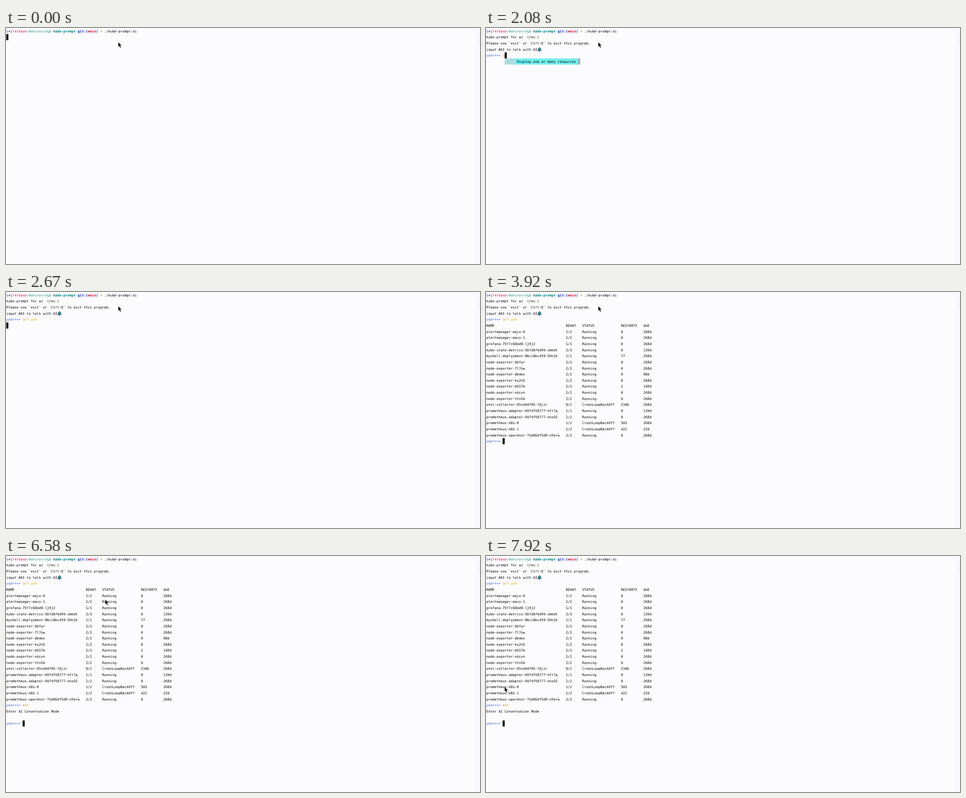
An HTML page for the animation above (8000 ms loop, 1058x529 px).

```html
<!DOCTYPE html>
<html lang="en">
<head>
<meta charset="utf-8">
<title>kube-prompt terminal</title>
<style>
  html, body { margin: 0; width: 100%; height: 100%; overflow: hidden; background: #fcfcfe; }
  svg { display: block; width: 1058px; height: 529px; }
  text { font: 7.562px "DejaVu Sans Mono", monospace; white-space: pre; text-rendering: geometricPrecision; }
  .b { font-weight: bold; }
</style>
</head>
<body>
<svg viewBox="0 0 1058 529">
  <rect x="1047" width="11" height="529" fill="#f7f8fe"/>
  <rect x="1057" y="24" width="1" height="9" fill="#dcdce4"/>
  <g id="screen"></g>
  <path id="mouse" d="M.4 .3V11.6L2.9 9.3L4.9 13.8L6.8 13L4.9 8.6H8.2Z" fill="#000" stroke="#fff" stroke-width=".6"/>
</svg>
<script>
const LOOP = 8000, CW = 4.553, LH = 13.65, LEFT = 0.7;
const BLUE = '#2a55ee', YELLOW = '#e9ab22', CYAN = '#a6e1e2', TURQUOISE = '#70eff0', GRAY = '#a8a8a8';
const screen = document.getElementById('screen'), mouse = document.getElementById('mouse');

const px = col => LEFT + col * CW;
const esc = s => s.replace(/&/g, '&amp;').replace(/</g, '&lt;').replace(/>/g, '&gt;');
const text = (col, row, s, fill = '#000', cls = '') =>
  `<text x="${px(col)}" y="${row * LH + 9.7}" fill="${fill}" class="${cls}">${esc(s)}</text>`;
const block = (col, row, cols, fill = '#000', rows = 1) =>
  `<rect x="${px(col)}" y="${row * LH}" width="${cols * CW}" height="${rows * LH}" fill="${fill}"/>`;
const prompt = (row, typed = '') => text(0, row, 'user>>>', BLUE) + text(8, row, typed, YELLOW);

// Completion list below the cursor; thumb is the number of rows the scroll thumb covers
function popup(col, row, items, note = '', thumb = items.length) {
  const w = Math.max(...items.map(s => s.length)) + 2;
  const nw = note && note.length + 2;
  return block(col, row, w, CYAN, items.length)
    + (note && block(col + w, row, nw, TURQUOISE) + text(col + w + 1, row, note))
    + block(col + w + +nw, row, 1, CYAN, items.length)
    + block(col + w + +nw, row, 1, GRAY, thumb)
    + items.map((s, i) => text(col + 1, row + i, s, '#bdc5c5')).join('');
}

const command = text(0, 0, '(') + text(1, 0, '⎈', '#1a3fe0', 'b') + text(2, 0, '|')
  + text(3, 0, 'release', '#cc1430') + text(10, 0, ':') + text(11, 0, 'monitoring', '#128c80')
  + text(21, 0, ')') + text(23, 0, 'kube-prompt', '#007a7c', 'b') + text(35, 0, 'git:(', '#1030d8', 'b')
  + text(40, 0, 'main', '#d01025', 'b') + text(44, 0, ')', '#1030d8', 'b')
  + text(46, 0, '✗', '#ae8600', 'b') + text(48, 0, './kube-prompt-ai');

const robot = `<g transform="translate(114.6 42.6)">
  <path d="M4.7 0V3" stroke="#456" stroke-width="1"/>
  <rect x="1.6" y="2" width="6.3" height="3.6" rx="1.4" fill="#3d6e7c"/>
  <rect x="0" y="4.2" width="9.5" height="4" rx="1.5" fill="#58a9b8"/>
  <rect x="1.4" y="4.6" width="6.7" height="5" rx="1.6" fill="#3f8796"/>
  <path d="M2.6 8.2H7" stroke="#254550" stroke-width="1"/></g>`;

const intro = text(0, 1, 'kube-prompt for ai  (rev-)')
  + text(0, 2, 'Please use `exit` or `Ctrl-D` to exit this program.')
  + text(0, 3, 'input #AI to talk with AI') + robot;

const columns = [0, 39, 47, 66, 77];
const table = `NAME READY STATUS RESTARTS AGE
alertmanager-main-0 2/2 Running 0 268d
alertmanager-main-1 2/2 Running 0 268d
grafana-75f7c68dd9-lj9j2 1/1 Running 0 268d
kube-state-metrics-56fd6fb499-zmkdt 3/3 Running 0 139d
myshell-deployment-86cc8bc459-59n2k 1/1 Running 77 268d
node-exporter-6bfwr 2/2 Running 0 268d
node-exporter-7l7nw 2/2 Running 0 268d
node-exporter-db4wv 2/2 Running 0 98d
node-exporter-kx2n5 2/2 Running 0 268d
node-exporter-m557m 2/2 Running 2 140d
node-exporter-sdcxn 2/2 Running 0 268d
node-exporter-ttn5d 2/2 Running 0 268d
otel-collector-65cdd4f85-l8jzr 0/1 CrashLoopBackOff 2106 268d
prometheus-adapter-6974f59777-htl7q 1/1 Running 0 139d
prometheus-adapter-6974f59777-nns92 1/1 Running 0 268d
prometheus-k8s-0 1/2 CrashLoopBackOff 503 268d
prometheus-k8s-1 1/2 CrashLoopBackOff 421 22d
prometheus-operator-75d9b475d9-n5krw 2/2 Running 0 268d`
  .split('\n').map((line, r) => line.split(' ').map((s, c) => text(columns[c], r + 5, s)).join('')).join('');

const getHint = [['get'], 'Display one or many resources'];
const podHint = [['pod', 'podsecuritypolicies', 'podtemplates']];
const allHint = [['clusters', 'componentstatuses', 'configmaps', 'daemonsets', 'deployments', 'endpoints'], '', 1];
const aiHint = [['#ai'], 'talk with ai'];

const typing = (row, typed, hint) =>
  prompt(row, typed) + popup(8 + typed.length, row + 1, ...hint) + block(8 + typed.length, row, 1);

const start = command + intro;
const listed = start + prompt(4, 'get pod') + table;
const chat = listed + prompt(24, '#AI') + text(0, 25, 'Enter AI Conversation Mode') + prompt(27);
const ready = start + prompt(4), idle = listed + prompt(24);

const scenes = [
  [0, command + block(0, 1, 1)],
  [170, ready + block(8, 4, 1)],
  [1170, ready],
  [1670, ready + block(8, 4, 1)],
  [2080, start + typing(4, 'g', getHint)],
  [2170, start + typing(4, 'ge', getHint)],
  [2250, start + typing(4, 'get', getHint)],
  [2330, start + typing(4, 'get ', allHint)],
  [2420, start + typing(4, 'get po', podHint)],
  [2500, start + typing(4, 'get pod', podHint)],
  [2670, start + prompt(4, 'get pod') + block(0, 5, 1)],
  [2920, idle + block(8, 24, 1)],
  [3420, idle],
  [3920, idle + block(8, 24, 1)],
  [4500, idle],
  [4920, listed + typing(24, '#', aiHint)],
  [5420, listed + typing(24, '#AI', aiHint)],
  [5920, chat + block(8, 27, 1)],
  [6920, chat],
  [7420, chat + block(8, 27, 1)],
];

// The pointer rests, then glides down-left, decelerating, at 12 steps per second
function pointer(t) {
  if (t < 6580) return [250, 31];
  const step = Math.floor((t + 5) * 12 / 1000) - 79;
  const left = (1 - Math.min(1, step / 16)) ** 2.65;
  return [41 + 180 * left, 293 - 196 * left];
}

let shown;
function frame() {
  const t = performance.now() % LOOP;
  const scene = scenes.findLast(s => s[0] <= t);
  if (scene !== shown) screen.innerHTML = (shown = scene)[1];
  mouse.setAttribute('transform', `translate(${pointer(t)})`);
  requestAnimationFrame(frame);
}
frame();
</script>
</body>
</html>
```
